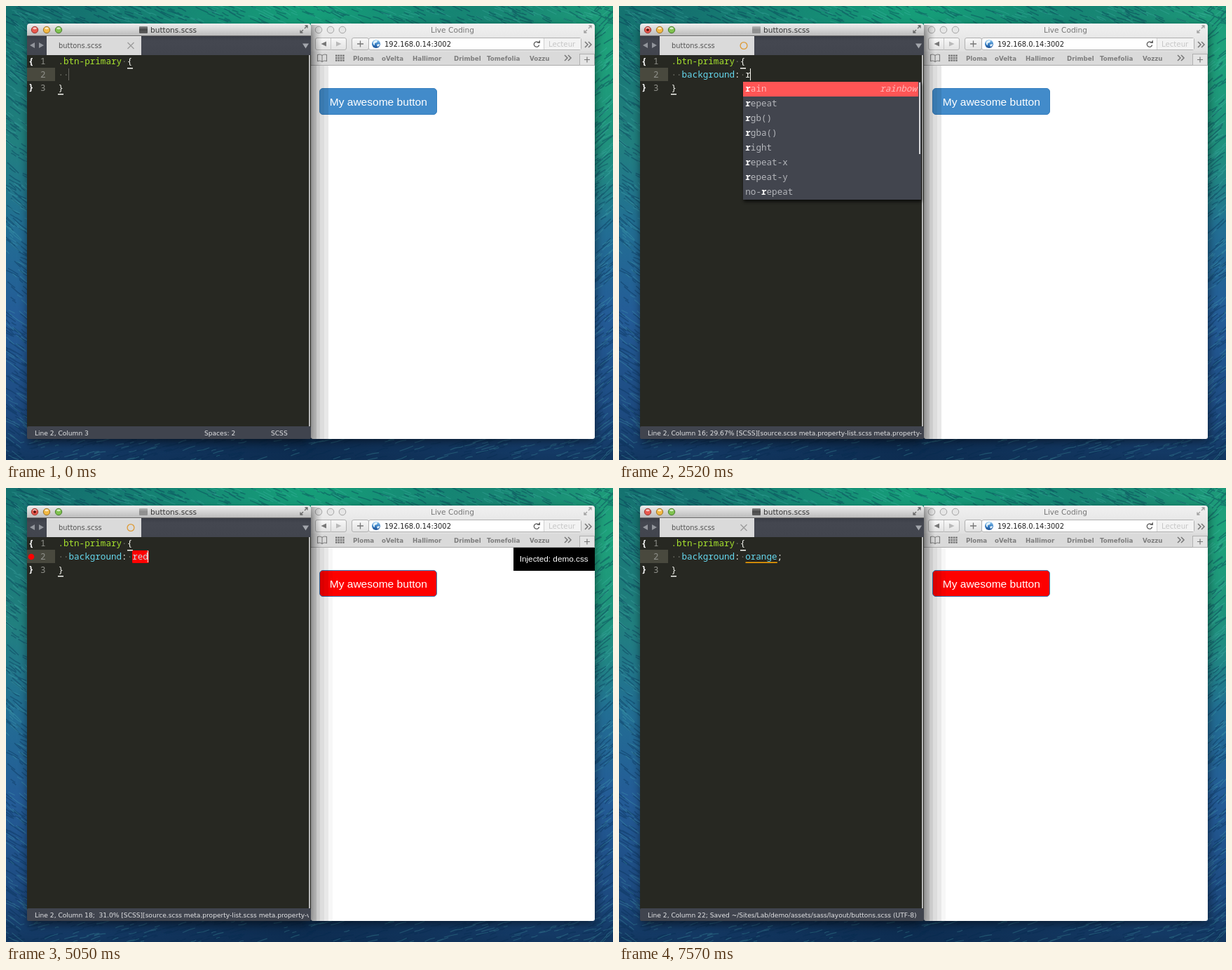
Animation of 866 by 647 pixels, one loop 8000 ms. Source, as an HTML page:

```html
<!DOCTYPE html>
<html lang="en">
<head>
<meta charset="utf-8">
<title>Live Coding</title>
<style>
html, body { margin: 0; width: 100%; height: 100%; overflow: hidden; background: #164a74; }
svg { display: block; width: 866px; height: 647px; }
text { white-space: pre; }
.ui { font-family: "DejaVu Sans", sans-serif; }
.code { font-family: "Noto Sans Mono", monospace; font-size: 12.6px; }
.web { font-family: "Liberation Sans", Arial, sans-serif; }
</style>
</head>
<body>
<svg id="stage" viewBox="0 0 866 647" xmlns="http://www.w3.org/2000/svg"></svg>
<script>
const LOOP = 8000;
const COL = 7.56, LEFT = 74.4;
const colX = c => LEFT + COL * c;

// Markup helpers
const rect = (x, y, w, h, fill, more = '') =>
  `<rect x="${x}" y="${y}" width="${w}" height="${h}" fill="${fill}" ${more}/>`;
const disc = (x, y, r, fill, more = '') =>
  `<circle cx="${x}" cy="${y}" r="${r}" fill="${fill}" ${more}/>`;
const path = (d, stroke, w = 1, more = '') =>
  `<path d="${d}" fill="none" stroke="${stroke}" stroke-width="${w}" ${more}/>`;
const shape = (d, fill) => `<path d="${d}" fill="${fill}"/>`;
const label = (x, y, s, size, fill, cls = 'ui', more = '') =>
  `<text x="${x}" y="${y}" class="${cls}" font-size="${size}" fill="${fill}" ${more}>${s}</text>`;
const code = (x, y, s, fill, more = '') =>
  `<text x="${x}" y="${y}" class="code" fill="${fill}" ${more}>${s}</text>`;
const span = (s, fill, more = '') => `<tspan fill="${fill}" ${more}>${s}</tspan>`;
const grad = (id, stops, dir = 'x2="0" y2="1"') =>
  `<linearGradient id="${id}" x1="0" y1="0" ${dir}>` +
  stops.map(([o, c]) => `<stop offset="${o}" stop-color="${c}"/>`).join('') + '</linearGradient>';
const glow = (id, x, y, r, c) =>
  `<radialGradient id="${id}" gradientUnits="userSpaceOnUse" cx="${x}" cy="${y}" r="${r}">` +
  `<stop offset="0" stop-color="${c}"/><stop offset="1" stop-color="${c}" stop-opacity="0"/></radialGradient>`;

const defs = '<defs>' +
  grad('sea', [[0, '#14726f'], [.3, '#21807f'], [.48, '#226f93'], [.68, '#245c97'], [.9, '#1d4a80'], [1, '#12365f']]) +
  glow('green1', 430, -10, 330, '#16a079') + glow('green2', 880, 60, 260, '#1fa57b') +
  glow('deep', 420, 660, 330, '#0d2c50') +
  grad('title', [[0, '#eeeeee'], [1, '#b9b9b9']]) +
  grad('pale', [[0, '#f1f1f1'], [1, '#d6d6d6']]) +
  grad('tabs', [[0, '#3a3d46'], [.25, '#444750'], [1, '#42454e']]) +
  grad('key', [[0, '#f8f8f8'], [1, '#e2e2e2']]) +
  grad('file', [[0, '#8a8a8a'], [.45, '#4a4a4a'], [1, '#5e5e5e']]) +
  grad('globe', [[0, '#9fd0f4'], [.5, '#3c84c8'], [1, '#1c4f93']]) +
  grad('cast', [[0, 'rgba(0,0,0,.26)'], [1, 'rgba(0,0,0,0)']], 'x2="1" y2="0"') +
  '<filter id="soft" x="-20%" y="-20%" width="140%" height="150%"><feGaussianBlur stdDeviation="7"/></filter>' +
  '<filter id="near" x="-10%" y="-20%" width="120%" height="180%"><feGaussianBlur stdDeviation="2"/></filter>' +
  '<clipPath id="bar"><rect x="30" y="599" width="402" height="18"/></clipPath></defs>';

function seeded(n) {
  return () => (n = (n * 16807) % 2147483647) / 2147483647;
}

// Rippled water, only where it shows around the windows
function water() {
  const rnd = seeded(4711), dark = [], light = [];
  const strips = [[0, 0, 32, 647, .75], [838, 0, 28, 647, -.85], [0, 0, 866, 26, .45], [0, 614, 866, 33, -.3]];
  strips.forEach(([x, y, w, h, slope]) => {
    for (let i = 0; i < 300; i++) {
      const px = x + rnd() * w, py = y + rnd() * h;
      const len = 5 + rnd() * 15, k = slope * (.6 + rnd() * .7);
      const d = `M${(px - len / 2).toFixed(1)} ${(py - len * k / 2).toFixed(1)}` +
        `q${(len / 2).toFixed(1)} ${(len * k / 2 + rnd() * 4 - 2).toFixed(1)} ${len.toFixed(1)} ${(len * k).toFixed(1)}`;
      (rnd() < .58 ? dark : light).push(d);
    }
  });
  return ['sea', 'green1', 'green2', 'deep'].map(g => rect(0, 0, 866, 647, `url(#${g})`)).join('') +
    path(dark.join(''), '#05294d', 1.5, 'opacity=".34"') +
    path(light.join(''), '#58c3c0', 1.1, 'opacity=".24"');
}

const expand = (x, c) =>
  path(`M${x + 1} 32l4 -4m-3.5 0h3.5v3.5M${x - 1} 34l-4 4m3.5 0h-3.5v-3.5`, c, 1.3);

function browser() {
  const top = 'M435 85V25H836q4 0 4 4V85z';
  let s = rect(436, 30, 404, 590, '#000', 'opacity=".55" filter="url(#soft)"') +
    rect(435, 80, 405, 537, '#fff', 'rx="3"') + shape(top, 'url(#pale)') +
    rect(435, 65, 405, 19, '#dadada') + rect(435, 84, 405, 1, '#a9a9a9');
  [446, 463, 480].forEach(x => s += disc(x, 34, 4.8, '#e6e6e6', 'stroke="#a5a5a5"'));
  s += label(606, 38, 'Live Coding', 10.6, '#777') + expand(830, '#a0a0a0');
  const key = (x, w) => rect(x + .5, 45.5, w, 17, 'url(#key)', 'rx="2.5" stroke="#b0b0b0"');
  s += key(441, 44) + path('M463.5 46v17', '#c4c4c4') +
    shape('M457 50.5v7l-7.500 -3.500z', '#777') + shape('M471 50.500v7l7.500 -3.500z', '#b9b9b9') +
    key(493, 24) + path('M501 54h9M505.500 49.500v9', '#777', 1.3) +
    rect(517.5, 45.5, 303, 17, '#fff', 'rx="2.500" stroke="#b0b0b0"') +
    rect(768, 46, 52, 16, '#f3f3f3') + path('M767.5 46v16', '#cfcfcf') +
    disc(528, 54, 6, 'url(#globe)') +
    shape('M524 51q3 -3 6 -2l-1 3 -3 1v3q-3 -1 -2 -5zM529 55l4 -1q0 3 -3 4z', '#e4f2fa') +
    label(540, 58, '192.168.0.14:3002', 9.95, '#222') +
    path('M760 52.500a3.700 3.700 0 1 0 .6 3', '#666', 1.4) + shape('M757.500 53h4.500v-4.500z', '#666') +
    label(774, 58, 'Lecteur', 10.2, '#c6c6c6');
  const more = (x, y, c) => path(`M${x - 5} ${y - 4}l4 4 -4 4m5 -8l4 4 -4 4`, c, 1.5);
  s += more(831, 55, '#777') + more(802, 74, '#777');
  s += path('M444.500 69.500q4 -1.500 6.500 1 2.500 -2.500 6.500 -1v9q-4 -1.500 -6.500 1 -2.500 -2.500 -6.500 -1zM451 70.500v9', '#7d7d7d', 1.1);
  for (let i = 0; i < 12; i++)
    s += rect(470 + i % 4 * 3.4, 69.5 + (i >> 2) * 3.4, 2.5, 2.5, '#777');
  [['Ploma', 495], ['oVelta', 536], ['Hallimor', 580], ['Drimbel', 639], ['Tomefolia', 686], ['Vozzu', 747]]
    .forEach(([n, x]) => s += label(x, 77.5, n, 8.7, '#7d7d7d', 'ui', 'font-weight="bold"'));
  return s + rect(818.5, 68.5, 21, 16, '#e4e4e4', 'stroke="#b0b0b0"') +
    path('M825 76.500h8M829 72.500v8', '#777', 1.2);
}

function editor() {
  let s = rect(32, 32, 401, 590, '#000', 'opacity=".6" filter="url(#soft)"') +
    rect(30, 40, 405, 577, '#272822', 'rx="3"') +
    shape('M30 43V29q0 -4 4 -4H431q4 0 4 4V43z', 'url(#title)') +
    rect(30, 42, 405, 1, '#666') +
    rect(30, 43, 405, 27, 'url(#tabs)') + rect(58, 43, 135, 27, '#dadada') +
    rect(58, 43, 135, 1, '#f0f0f0');
  [[41, '#e8584e', '#97332c'], [58, '#f2b843', '#9a7022'], [75, '#7fc24f', '#457a29']].forEach(([x, c, edge]) => {
    s += disc(x, 34, 4.7, c, `stroke="${edge}"`) +
      `<ellipse cx="${x}" cy="31.700" rx="2.700" ry="1.500" fill="#fff" opacity=".65"/>`;
  });
  s += label(206, 38, 'buttons.scss', 10.55, '#333') + expand(425, '#666') +
    shape('M41 52v8l-7 -4z', '#92959c') + shape('M47 52v8l7 -4z', '#92959c') +
    shape('M423 53.500h9l-4.500 7z', '#a3a6ac') + label(75, 60, 'buttons.scss', 9.9, '#555') +
    rect(30, 88, 40, 19, '#49493e') + rect(432, 70, 2, 529, '#b9b9b9') +
    rect(30, 599, 405, 18, '#40444e', 'rx="2"');
  [83.3, 102, 120.7].forEach((y, i) => s += code(49, y, i + 1, '#90918b'));
  s += code(32, 83, '{', '#fff', 'font-weight="bold"') + code(32, 120.4, '}', '#fff', 'font-weight="bold"');
  s += code(LEFT, 83.3, span('.btn-primary', '#a6e22e') + span('·', '#74756c') + span('{', '#f8f8f2'), '#fff') +
    code(LEFT, 120.7, '}', '#f8f8f2');
  return s + rect(173, 88, 8, 1.5, '#f8f8f2') + rect(74, 125, 8, 1.5, '#f8f8f2');
}

const words = s => s.split(' ');
const lists = {
  b: words('background border bottom border-top border-left border-color border-width box-shadow'),
  ba: words('background background-size background-color background-image background-clip background-repeat'),
  r: words('rain repeat rgb() rgba() right repeat-x repeat-y no-repeat'),
  re: words('repeat repeat-x repeat-y no-repeat'),
  o: words('no-repeat bottom top local scroll border-box'),
  or: words('no-repeat border-box'),
  ora: ['no-repeat']
};
lists.bac = lists.back = lists.ba;

// time, property, value, caret strength, extras
const steps = [
  [0, '', '', .3],
  [140, '', '', 1],
  [440, '', '', .3],
  [590, '', '', 0],
  [1030, 'b', '', 1, { pct: 27.67 }],
  [1180, 'ba', '', 1, { pct: 28, list: 1 }],
  [1330, 'bac', '', 1, { pct: 28.33, list: 1 }],
  [1480, 'back', '', 1, { pct: 28.67, list: 1 }],
  [1780, 'background', '', 1, { pct: 29.33 }],
  [2230, 'background', '', .3, { pct: 29.33 }],
  [2380, 'background', 'r', 1, { pct: 29.67 }],
  [2520, 'background', 'r', 1, { pct: 29.67, list: 1 }],
  [2670, 'background', 're', 1, { pct: 30, list: 1 }],
  [2810, 'background', 'red', 1, { pct: 30.33 }],
  [3110, 'background', 'red;', 1, { pct: 30.67 }],
  [3410, 'background', 'red;', .3, { saved: 1 }],
  [3560, 'background', 'red;', .1, { saved: 1 }],
  [4000, 'background', 'red;', .3, { saved: 1 }],
  [4150, 'background', 'red;', 1, { saved: 1 }],
  [4450, 'background', 'red;', .3, { saved: 1 }],
  [4600, 'background', 'red;', .1, { saved: 1 }],
  [5050, 'background', 'red', 1, { pct: 31 }],
  [5490, 'background', '', 1, { pct: 31.33 }],
  [5640, 'background', '', 1, { pct: 31.33 }],
  [5940, 'background', 'o', 1, { pct: 31.67 }],
  [6090, 'background', 'o', 1, { pct: 31.67, list: 1 }],
  [6230, 'background', 'or', 1, { pct: 32, list: 1 }],
  [6380, 'background', 'ora', 1, { pct: 32.33, list: 1 }],
  [6520, 'background', 'oran', 1, { pct: 32.67 }],
  [6670, 'background', 'orange', 1, { pct: 33.33 }],
  [6970, 'background', 'orange;', 1, { pct: 33.67 }],
  [7270, 'background', 'orange;', .3, { pct: 33.67 }],
  [7420, 'background', 'orange;', 0, { saved: 1 }],
  [7570, 'background', 'orange;', 0, { saved: 1 }]
];
const inks = { red: '#f00', orange: '#ffa500' };

function page(t) {
  const red = t >= 4600;
  let s = rect(447.5, 117.5, 167, 37, red ? '#fd0000' : '#428bca', 'rx="4.500" stroke="#357ebd"') +
    label(461.7, 142, 'My awesome button', 15.55, '#fff', 'web');
  if (red && t < 5640)
    s += rect(724, 85, 116, 33, '#000') + label(732.7, 105.3, 'Injected: demo.css', 11.75, '#fff', 'web');
  // stepped shade cast by the front window
  [[435, 8, .27], [443, 5, .19], [448, 6, .135], [454, 6, .09], [460, 6, red ? .03 : 0]]
    .forEach(([x, w, a]) => s += rect(x, 85, w, 532, '#000', `opacity="${a}"`));
  return s + rect(435, 27, 16, 58, 'url(#cast)');
}

function popup(query, col) {
  const items = lists[query], x = Math.round(colX(col) - 3), h = items.length * 21, full = items.length > 7;
  let s = rect(x + 1, 111, 254, h, '#000', 'opacity=".7" filter="url(#near)"') +
    rect(x, 108, 254, h, '#42454e') + rect(x, 108, full ? 250 : 254, 21, '#ff5555');
  if (full) s += rect(x + 251, 109, 2, 102, '#d4d5d8');
  items.forEach((item, row) => {
    const plain = row ? '#b3b5ba' : '#ffb9b9', y = 122.3 + row * 21;
    let k = 0;
    const body = [...item].map(ch => ch === query[k]
      ? (k++, span(ch, '#fff', 'font-weight="bold"')) : span(ch, plain)).join('');
    s += code(x + 3.3, y, body, plain);
    if (item === 'rain')
      s += code(x + 248, y, 'rainbow', plain, 'font-style="italic" text-anchor="end"');
  });
  return s;
}

function status(column, { pct, saved }) {
  let s = `Line 2, Column ${column}`, tail = '';
  if (saved) s += '; Saved ~/Sites/Lab/demo/assets/sass/layout/buttons.scss (UTF-8)';
  else if (pct) {
    const n = Number.isInteger(pct) ? pct.toFixed(1) : String(pct);
    s += `; ${n.padStart(5)}% [SCSS][source.scss meta.property-list.scss meta.property-value.scss`;
  } else tail = label(283, 611.5, 'Spaces: 2', 9.1, '#e3e4e6') + label(378, 611.5, 'SCSS', 9.1, '#e3e4e6');
  return `<g clip-path="url(#bar)">${label(41, 611.5, s, 9.1, '#e3e4e6')}${tail}</g>`;
}

function typing([, prop, value, caret, extra = {}]) {
  const whole = prop === 'background', dirty = extra.pct;
  const word = value.replace(';', ''), ink = inks[word], marked = ink && word === value;
  const len = 2 + (whole ? 12 : prop.length) + value.length;
  let s = rect(190, 29, 12, 10, 'url(#file)', `rx="1" opacity="${dirty ? .5 : 1}"`);
  s += dirty
    ? disc(178, 56.5, 4.9, 'none', 'stroke="#dd9a35" stroke-width="1.300"') + disc(41, 34, 1.9, '#5c120e')
    : path('M173.500 52l9 9m0 -9l-9 9', '#9b9b9b', 1.3);
  if (ink) s += marked
    ? rect(180, 89, COL * word.length + 1, 18, ink, 'rx="1.500"') + disc(36, 98, 4.3, ink)
    : rect(180.5, 105.5, COL * word.length, 1.5, ink);
  const dot = n => span('·'.repeat(n), '#74756c');
  let line = dot(2) + span(prop, whole ? '#66d9ef' : '#f8f8f2');
  if (whole) line += span(':', '#f8f8f2') + dot(1) +
    span(word, marked ? '#c9dde6' : ink ? '#66d9ef' : '#f8f8f2') + span(value.slice(word.length), '#f8f8f2');
  s += code(LEFT, 102, line, '#f8f8f2') +
    rect(Math.round(colX(len) - .8), 89, 1, 17, '#f8f8f0', `opacity="${caret}"`) +
    status(len + 1, extra);
  if (extra.list) s += whole ? popup(value, 14) : popup(prop, 2);
  return s;
}

const stage = document.getElementById('stage');
stage.innerHTML = defs + water() + browser() + '<g id="page"></g>' + editor() + '<g id="typing"></g>';
const pageLayer = document.getElementById('page');
const typeLayer = document.getElementById('typing');
let shown = -1;

function draw(t) {
  let i = steps.length - 1;
  while (steps[i][0] > t) i--;
  if (i === shown) return;
  shown = i;
  pageLayer.innerHTML = page(steps[i][0]);
  typeLayer.innerHTML = typing(steps[i]);
}

function tick() {
  draw(performance.now() % LOOP);
  requestAnimationFrame(tick);
}
tick();
</script>
</body>
</html>
```
